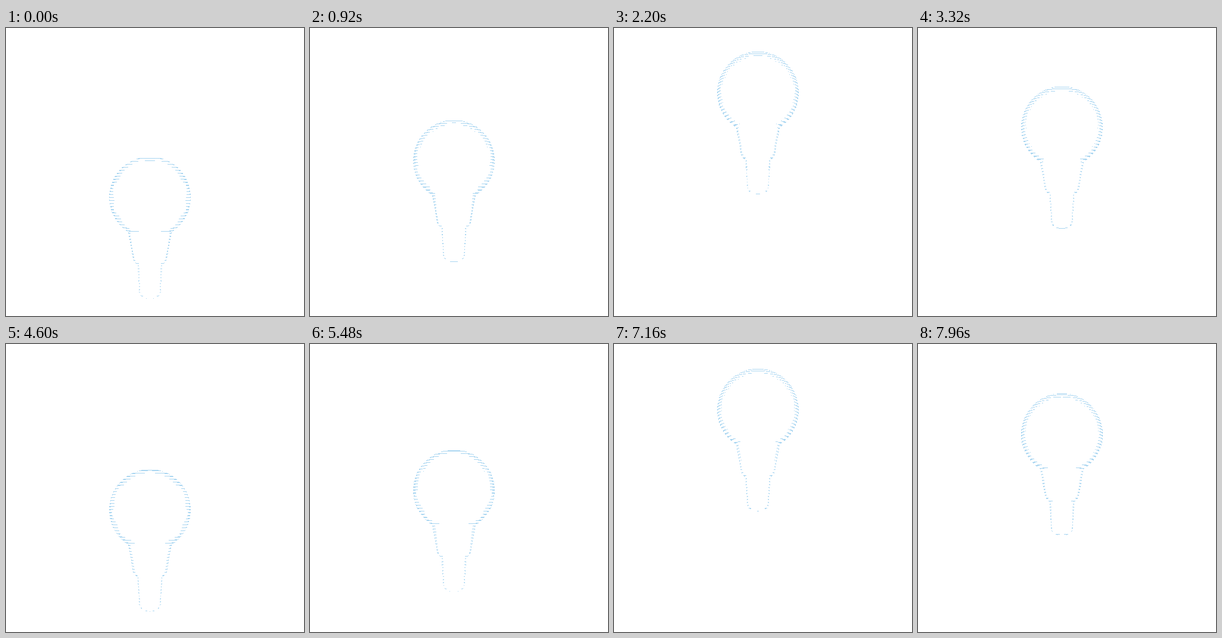
Recreate the animation shown at these times as an HTML page with a canvas. Size 500x485 px, loop 8 s.

```html
<!DOCTYPE html>
<html lang="en">
<head>
<meta charset="utf-8">
<title>Hologram bulb</title>
<style>
  html, body { margin: 0; width: 100%; height: 100%; overflow: hidden; background: #fff; }
  canvas { display: block; }
</style>
</head>
<body>
<canvas id="stage" width="500" height="485"></canvas>
<script>
const ctx = document.getElementById('stage').getContext('2d');
const WIDTH = 500, HEIGHT = 485;
const LOOP = 8000, TICK = 40;
const AXIS = 241, EYE = 242, FOCAL = 1094;
const GLOBE = 68.5, BULB_HEIGHT = 239;
const STRIPE = 5, STRIPE_START = 219, STRIPE_DRIFT = 2.5;
const GLOW_LIMIT = 0.135;
const COLOR = [170, 214, 241];

const mix = (a, b, u) => a + (b - a) * u;

// Radius of the bulb at a distance y below its top.
function radius(y) {
  if (y < 0 || y > BULB_HEIGHT) return 0;
  if (y < 126.5) return Math.sqrt(Math.max(0, GLOBE ** 2 - (y - GLOBE) ** 2));
  if (y < 169) return mix(36.5, 29, (y - 126.5) / 42.5);
  if (y < 181) return 29 - 7 * ((y - 169) / 12) ** 2;
  if (y < 228) return mix(21, 18, (y - 181) / 47);
  return 18 * Math.sqrt(1 - ((y - 228) / 11) ** 2);
}

// Depth of the nearest surface point along a slightly sloped view ray.
function findDepth(x, y, slope) {
  const inside = z => {
    const r = radius(y - slope * z);
    return r > 0 && x * x + z * z <= r * r;
  };
  let near = Math.sqrt(70 * 70 - x * x);
  while (near > -16 && !inside(near)) near -= 1;
  if (near <= -16) return null;
  let far = near;
  near += 1;
  for (let i = 0; i < 6; i++) {
    const mid = (near + far) / 2;
    if (inside(mid)) far = mid; else near = mid;
  }
  return far;
}

// One minus the cosine between the surface normal and the view direction.
function rimLight(x, y, z, slope) {
  const steepness = (radius(y + 0.1) - radius(y - 0.1)) / 0.2;
  const facing = (z / (Math.hypot(x, z) || 1) + steepness * slope) /
    (Math.hypot(1, steepness) * Math.hypot(1, slope));
  return Math.min(1, 1 - facing);
}

// The bulb bobs with a slowly shrinking swing.
function bulbTop(seconds) {
  const swing = 90 - 0.8 * seconds;
  return 126.8 + swing * Math.cos(2 * Math.PI * (seconds + 0.035) / 4.805);
}

function draw(seconds) {
  const top = bulbTop(seconds);
  const image = ctx.createImageData(WIDTH, HEIGHT);
  const paint = (x, y) => image.data.set([...COLOR, 255], 4 * (y * WIDTH + x));

  const last = Math.min(HEIGHT - 1, Math.ceil(top + BULB_HEIGHT + 8));
  for (let row = Math.max(0, Math.floor(top - 8)); row <= last; row++) {
    const slope = (row + 0.5 - EYE) / FOCAL;
    const y = row + 0.5 - top;
    for (let x = 0; x < 69; x++) {
      const z = findDepth(x, y, slope);
      if (z === null) continue;
      const height = y - slope * z;
      const phase = (height + top - STRIPE_START + STRIPE_DRIFT * seconds) / STRIPE;
      const stripe = 1 - (phase - Math.floor(phase));
      if ((stripe * rimLight(x, height, z, slope)) ** 3 > GLOW_LIMIT) {
        paint(AXIS - x, row);
        paint(AXIS + x, row);
      }
    }
  }
  ctx.putImageData(image, 0, 0);
}

const start = performance.now();
let shown = -1;
function frame() {
  const elapsed = (performance.now() - start) % LOOP;
  const time = Math.floor(elapsed / TICK) * TICK;
  if (time !== shown) {
    shown = time;
    draw(time / 1000);
  }
  requestAnimationFrame(frame);
}
frame();
</script>
</body>
</html>
```
